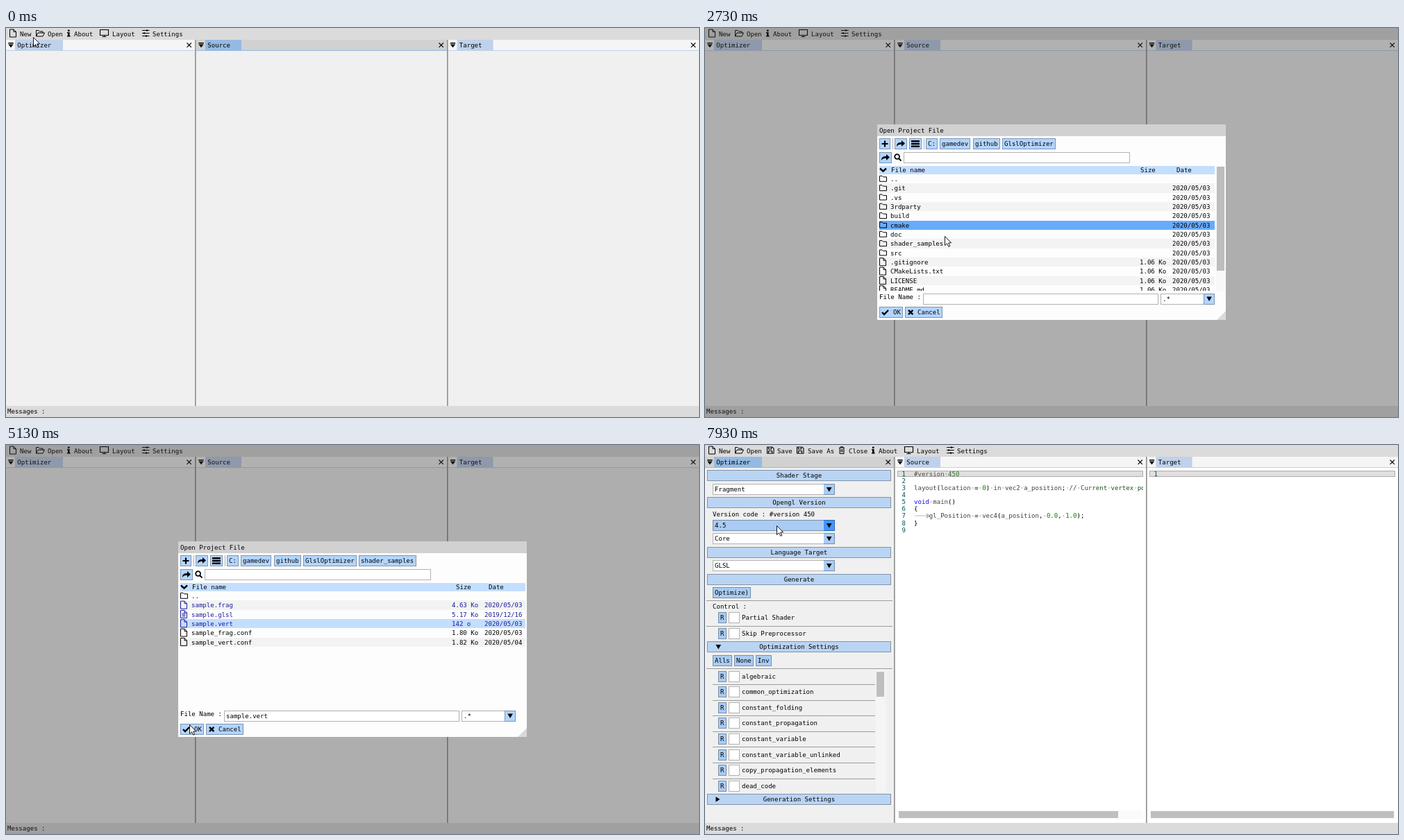
An HTML page with a canvas that plays this animation: 998 by 561 pixels, repeating every 8 s.

```html
<!DOCTYPE html>
<html lang="en">
<head>
<meta charset="utf-8">
<title>Shader optimizer</title>
<style>
  html, body { margin: 0; width: 100%; height: 100%; overflow: hidden; background: #f0f0f0; }
  canvas { display: block; width: 998px; height: 561px; }
</style>
</head>
<body>
<canvas id="stage" width="998" height="561"></canvas>
<script>
const g = document.getElementById('stage').getContext('2d');
const CHAR = 5.454, ROW = 13.33;
const BLUE = '#4296fa', PRESS = '#0f87fa', BUTTON = '#b3d5fe', PANEL_BUTTON = '#aaccf4';
const EDGE = 'rgba(0,0,0,.3)';

// [path, line width]; width 0 means filled. Origin: left edge, vertical centre.
const ICONS = {
  file: ['M.5-5.5h5.5l3.5 3.5v7.5h-9zM6-5.5v3.5h3.5', 1],
  lines: ['M2.5-1h5M2.5 1h5M2.5 3h5', 1],
  open: ['M.5 4.5v-8.5h3.5l1.5 1.5h4.5v2M.5 4.5l2.5-5h9.5l-2.5 5z', 1],
  info: ['M1-5h2.6v2.4h-2.6zM0-1.5h3.6v5h1v1.6h-4.6v-1.6h1v-3.4h-1z', 0],
  monitor: ['M.5-5h12v8h-12zM6.5 3v2M3.5 5h6', 1.1],
  sliders: ['M0-4h10.5M0 0h10.5M0 4h10.5M7-5.5v3M3-1.5v3M6 2.5v3', 1.2],
  save: ['M.5-4.5h7.5l2 2v7h-9.5zM2.5-4.5v3h4v-3M2.5 4.5v-3.5h5v3.5', 1.1],
  trash: ['M0-3.5h8M2.5-3.5v-1.5h3v1.5M1-3.5v8.5h6v-8.5M3-1.5v4.5M5-1.5v4.5', 1],
  folder: ['M.5-4h3.5l1.5 1.5h5v6.5h-10z', 1],
  plus: ['M0 0h9M4.5-4.5v9', 2.2],
  share: ['M0 4c0-5 2.5-6 7-6v-3l5 4.5l-5 4.5v-3c-4 0-5.5.5-7 3z', 0],
  drives: ['M0-5h12v2.6h-12zM0-1.3h12v2.6h-12zM0 2.4h12v2.6h-12z', 0],
  search: ['M8-1a3.4 3.4 0 1 1-6.8 0a3.4 3.4 0 1 1 6.8 0M7 1.5l3.5 3.5', 1.8],
  check: ['M1 0l3 3l6-6', 2.4],
  cross: ['M1-3.2l6.4 6.4M7.4-3.2l-6.4 6.4', 2.4],
  close: ['M0-3l6.4 6.4M6.4-3l-6.4 6.4', 1.1],
  chevron: ['M1-2l4.5 4.2l4.5-4.2', 2.4],
  menu: ['M0-4h7.4v1.4h-7.4zM0-1.4h7.4l-3.7 4.6z', 0],
  down: ['M0-3h7.6l-3.8 6.4z', 0],
  right: ['M0-3.8v7.6l6-3.8z', 0],
  pointer: ['M0 0v13l3-2.7l2.3 4.5l2-.9l-2.2-4.4l4-.2z', 0]
};

const BUILD = ['..', '.vs', '3rdparty', 'CMakeFiles', 'Debug', 'GlslOptimizerV2', 'GlslOptimizerV2App.dir',
  'ImGuiColorTextEdit.dir', 'ImGuiFileDialog.dir', 'Win32', 'ctools.dir', 'glad.dir', 'imgui.dir']
  .map((name, i) => ({ name, size: '', date: i ? '2020/05/03' : '', dir: true }));
const ROOT = ['..', '.git', '.vs', '3rdparty', 'build', 'cmake', 'doc', 'shader_samples', 'src',
  '.gitignore', 'CMakeLists.txt', 'LICENSE', 'README.md']
  .map((name, i) => ({ name, size: i > 8 ? '1.06 Ko' : '', date: i ? '2020/05/03' : '', dir: i < 9 }));
const SAMPLES = [
  { name: '..', size: '', date: '', dir: true },
  { name: 'sample.frag', size: '4.63 Ko', date: '2020/05/03', code: true },
  { name: 'sample.glsl', size: '5.17 Ko', date: '2019/12/16', code: true },
  { name: 'sample.vert', size: '142 o', date: '2020/05/03', code: true },
  { name: 'sample_frag.conf', size: '1.80 Ko', date: '2020/05/03' },
  { name: 'sample_vert.conf', size: '1.82 Ko', date: '2020/05/04' }
];
const CODE = ['#version 450', '', 'layout(location = 0) in vec2 a_position; // Current vertex position', '',
  'void main()', '{', '\tgl_Position = vec4(a_position, 0.0, 1.0);', '}', ''];
const PASSES = ['algebraic', 'common_optimization', 'constant_folding', 'constant_propagation',
  'constant_variable', 'constant_variable_unlinked', 'copy_propagation_elements', 'dead_code'];

// Pointer path: time, x, y
const PATH = [
  [0, 39, 13], [130, 50, 10], [200, 50, 10], [330, 60, 9], [1000, 60, 9], [1200, 110, 45], [1400, 270, 150],
  [1530, 400, 182], [1670, 465, 173], [1800, 473, 171], [2200, 473, 171], [2470, 430, 235], [2730, 345, 300],
  [2930, 325, 308], [3200, 325, 308], [3400, 325, 304], [3530, 323, 296], [3670, 322, 281], [3730, 322, 271],
  [3800, 320, 258], [3930, 318, 246], [4070, 318, 246], [4200, 316, 257], [4800, 316, 257], [5000, 292, 350],
  [5130, 264, 403], [5400, 268, 407], [6130, 268, 407], [6330, 318, 370], [6470, 316, 310], [6600, 225, 262],
  [6670, 207, 251], [6870, 207, 251], [7130, 170, 190], [7330, 112, 105], [7400, 105, 99], [7530, 103, 113],
  [7600, 103, 116], [8000, 103, 116]
];
const CLICKS = [[2130, 2200], [3200, 3270], [4670, 4730], [5730, 5870]];

let time, hot, pressed;

const stepTime = k => Math.round(k * 20 / 3) * 10;

function pointerAt(t) {
  const i = Math.max(1, PATH.findIndex(p => p[0] >= t));
  const [t0, x0, y0] = PATH[i - 1], [t1, x1, y1] = PATH[i];
  const u = (t - t0) / (t1 - t0);
  return { x: x0 + (x1 - x0) * u, y: y0 + (y1 - y0) * u };
}

const over = (x, y, w, h) => hot.x >= x && hot.x < x + w && hot.y >= y && hot.y < y + h;
const react = (isHot, base) => !isHot ? base : pressed ? PRESS : BLUE;

function rect(x, y, w, h, fill) {
  g.fillStyle = fill;
  g.fillRect(x, y, w, h);
}
function box(x, y, w, h, fill, edge = EDGE) {
  rect(x, y, w, h, fill);
  g.strokeStyle = edge;
  g.lineWidth = 1;
  g.strokeRect(x + .5, y + .5, w - 1, h - 1);
}
function text(s, x, y, color = '#000') {
  g.fillStyle = color;
  g.fillText(s, x, Math.round(y + 3.1));
}
function icon(name, x, y, color = '#000') {
  const [d, width] = ICONS[name];
  g.save();
  g.translate(x, y);
  g.fillStyle = g.strokeStyle = color;
  g.lineWidth = width;
  width ? g.stroke(new Path2D(d)) : g.fill(new Path2D(d));
  g.restore();
}
function clipped(x, y, w, h, draw) {
  g.save();
  g.beginPath();
  g.rect(x, y, w, h);
  g.clip();
  draw();
  g.restore();
}
function button(x, y, w, label, base = BUTTON, pad = 3) {
  box(x, y, w, 16, react(over(x, y, w, 16), base));
  text(label, x + pad, y + 8.3);
}
function iconButton(x, y, w, name, dx) {
  box(x, y, w, 16, react(over(x, y, w, 16), BUTTON));
  icon(name, x + dx, y + 8);
}

function menuBar(loaded) {
  rect(0, 0, 998, 17, '#dbdbdb');
  const rest = loaded ? 152 : 0;
  const items = [['file', 5, 'New', 20], ['open', 43, 'Open', 60]];
  if (loaded) items.push(['save', 89, 'Save', 104], ['save', 132, 'Save As', 148], ['trash', 193, 'Close', 207]);
  items.push(['info', 88 + rest, 'About', 98 + rest], ['monitor', 135 + rest, 'Layout', 153 + rest],
    ['sliders', 196 + rest, 'Settings', 211 + rest]);
  for (const [name, ix, label, x] of items) {
    icon(name, ix, 7.5);
    text(label, x, 8.5);
  }
}

function titleBar(x, w, label, tabWidth, focused) {
  const tab = focused ? '#94bae3' : '#bfd1ec';
  rect(x, 17, w, 15, focused ? '#d1d1d1' : '#f5f5f5');
  rect(x + 13, 17, tabWidth, 15, tab);
  rect(x, 32, w, 1, tab);
  icon('menu', x + 3.3, 25);
  text(label, x + 16.3, 25);
  icon('close', x + w - 11.5, 24.5);
}

function header(y, label, arrow) {
  box(3, y, 265, 16, over(3, y, 265, 16) ? '#65a8f8' : '#bad4f3');
  text(label, 135.5 - label.length * CHAR / 2, y + 8.3);
  if (arrow) icon(arrow, 15.5, y + 8);
}
function combo(y, label) {
  const isHot = over(11, y, 176, 16);
  rect(11, y, 160, 16, isHot ? PANEL_BUTTON : '#fff');
  box(171, y, 16, 16, isHot ? BLUE : PANEL_BUTTON, 'rgba(0,0,0,0)');
  icon('down', 175, y + 8);
  box(11, y, 176, 16, 'rgba(0,0,0,0)');
  text(label, 14, y + 8.3);
}
function option(y, label) {
  button(19, y - 8, 12, 'R', PANEL_BUTTON);
  box(34, y - 8, 16, 16, '#fff');
  text(label, 53, y + .3);
}
const rule = (x, y, w) => rect(x, Math.round(y), w, 1, '#9c9c9c');

function optimizerPanel() {
  header(36, 'Shader Stage');
  combo(56, 'Fragment');
  header(75, 'Opengl Version');
  text('Version code : #version 450', 11, 100);
  combo(108, '4.5');
  combo(127, 'Core');
  header(147, 'Language Target');
  combo(166, 'GLSL');
  header(186, 'Generate');
  button(11, 205, 55, 'Optimize)', PANEL_BUTTON);
  rule(2, 224, 268);
  text('Control :', 11, 233);
  option(249, 'Partial Shader');
  rule(2, 261, 268);
  option(272, 'Skip Preprocessor');
  header(283, 'Optimization Settings', 'down');
  button(11, 303, 28, 'Alls', PANEL_BUTTON);
  button(42, 303, 28, 'None', PANEL_BUTTON);
  button(73, 303, 23, 'Inv', PANEL_BUTTON);
  rule(2, 322, 268);
  clipped(3, 325, 265, 175, () => {
    PASSES.forEach((name, i) => {
      const y = 333.5 + i * 22.6;
      option(Math.round(y), name);
      rule(11, y + 11.5, 234);
    });
    rect(246, 325, 14, 175, '#f5f5f5');
    rect(247, 327, 11, 36, '#bebebe');
  });
  header(503, 'Generation Settings', 'right');
}

function tokenColor(token, preprocessor) {
  const number = /^\d/.test(token);
  if (preprocessor) return number ? '#307020' : '#505040';
  if (number) return '#008000';
  if (token.startsWith('//')) return '#205020';
  if (token === 'void') return '#060cff';
  return /\w/.test(token) ? '#404040' : '#000';
}
function codeLine(line, x, y) {
  for (const token of line.match(/\/\/.*|\d+\.\d|\d+|[A-Za-z_]\w*|\s|./g) || []) {
    if (token === '\t') {
      rect(x + 1, Math.round(y) - .5, 19, 1, '#bbb');
      icon('right', x + 18, y, '#bbb');
      x += 4 * CHAR;
      continue;
    }
    text(token, x, y, tokenColor(token, line[0] === '#'));
    [...token].forEach((c, i) => c === ' ' && rect(x + (i + .5) * CHAR - .6, y - .6, 1.3, 1.3, '#909090'));
    x += token.length * CHAR;
  }
}
function editor(x, w, lines, thumbWidth) {
  rect(x - 3, 33, w + 7, 512, '#fff');
  box(x, 37, w, 9, '#dfdfdf', '#adadad');
  clipped(x, 34, w, 500, () => lines.forEach((line, i) => {
    const y = 41.7 + i * 10.1;
    text(String(i + 1), x + 6.5, y, '#005050');
    codeLine(line, x + 24, y);
  }));
  rect(x, 527, w, 12, '#fafafa');
  rect(x + 2, 528, thumbWidth, 10, '#bfbfbf');
}

function fileList(rows, scroll, chosen) {
  const right = scroll ? 734 : 748, shift = scroll ? 0 : 16;
  rect(251, 199, right - 251, 12, '#c4deff');
  icon('chevron', 251, 204.5);
  text('File name', 268, 205);
  text('Size', 627 + (scroll ? 0 : 21), 205);
  text('Date', 679 + shift, 205);
  clipped(248, 211, 502, 168, () => rows.forEach((row, i) => {
    const y = 217.8 + i * ROW, top = Math.round(y - ROW / 2);
    const height = Math.round(y + ROW / 2) - top, width = right - 251;
    const color = row.code ? '#1a1a9c' : '#000';
    if (i % 2) rect(251, top, width, height, '#f3f3f3');
    if (row.name === chosen) rect(251, top, width, height, '#c4deff');
    if (over(251, top, width, height)) rect(251, top, width, height, pressed ? BLUE : '#68abfb');
    icon(row.dir ? 'folder' : 'file', 251, y - .5, color);
    if (row.name === 'sample.glsl') icon('lines', 251, y - .5, color);
    text(row.name, 267, y, color);
    text(row.size, 626 + shift, y, color);
    text(row.date, 673 + shift, y, color);
  }));
  if (scroll) {
    rect(736, 199, 13, 181, '#f8f8f8');
    rect(737, 200, 11, scroll, '#bdbdbd');
  }
}

function dialog() {
  rect(248, 139, 502, 282, '#fdfdfd');
  rect(248, 139, 502, 17, '#d1d1d1');
  text('Open Project File', 251, 148);
  iconButton(251, 159, 16, 'plus', 3.5);
  rect(270, 159, 1, 16, '#b0b0b0');
  iconButton(273, 159, 18, 'share', 3);
  iconButton(294, 159, 18, 'drives', 3);
  rect(315, 159, 1, 16, '#b0b0b0');

  const folder = time < 2200 ? ['build'] : time < 3270 ? [] : ['shader_samples'];
  let x = 318;
  for (const part of ['C:', 'gamedev', 'github', 'GlslOptimizer', ...folder]) {
    const w = part.length * CHAR + 6.2;
    button(Math.round(x), 159, Math.round(w), part);
    x += w + 3.1;
  }
  iconButton(251, 179, 18, 'share', 3);
  icon('search', 272, 186.5);
  box(286, 179, 326, 16, '#fff');

  const chosen = time >= 4730 ? 'sample.vert' : '';
  if (time < 2200) fileList(BUILD, 56);
  else if (time < 3270) fileList(ROOT, 150);
  else fileList(SAMPLES, 0, chosen);

  text('File Name :', 251, 388.3);
  box(314, 383, 339, 16, '#fff');
  text(chosen, 317, 391);
  box(656, 383, 78, 16, '#fff');
  text('.*', 659, 391);
  box(718, 383, 16, 16, BUTTON);
  icon('down', 722.3, 390.5);

  button(251, 402, 34, 'OK', BUTTON, 20);
  icon('check', 254, 410);
  button(288, 402, 54, 'Cancel', BUTTON, 18);
  icon('cross', 292, 410);
  g.fillStyle = '#d9d9d9';
  g.fill(new Path2D('M750 408v13h-13z'));
}

function pointer({ x, y }) {
  icon('pointer', x + .5, y + .5, '#fff');
  g.save();
  g.translate(x + .5, y + .5);
  g.strokeStyle = '#000';
  g.lineWidth = .9;
  g.stroke(new Path2D(ICONS.pointer[0]));
  g.restore();
}

function draw(k) {
  time = stepTime(k);
  // Widgets answer to where the pointer was one step earlier.
  hot = pointerAt(stepTime(Math.max(0, k - 1)));
  pressed = CLICKS.some(([from, to]) => time >= from && time < to);
  const loaded = time >= 5870, modal = time >= 730 && !loaded;

  rect(0, 0, 998, 561, '#f0f0f0');
  menuBar(loaded);
  if (loaded) {
    optimizerPanel();
    editor(277, 354, CODE, 316);
    editor(640, 354, [''], 350);
  }
  titleBar(0, 272, 'Optimizer', 69, time >= 7930);
  titleBar(274, 361, 'Source', 52, time < 600 || (loaded && time < 7930));
  titleBar(636.5, 361.5, 'Target', 52, false);
  rect(272, 17, 1.6, 528, '#8f8f8f');
  rect(635, 17, 1.6, 528, '#8f8f8f');
  rect(0, 545, 998, 16, '#dbdbdb');
  text('Messages :', 2, 553);

  if (modal) {
    rect(0, 0, 998, 561, `rgba(51,51,51,${time < 800 ? .19 : .35})`);
    dialog();
  }
  pointer(pointerAt(time));
}

const start = performance.now();
let shown = -1;
function tick() {
  const t = (performance.now() - start) % 8000;
  const k = Math.floor((t + 3.5) * 3 / 200) % 120;
  if (k !== shown) {
    g.font = '9.06px "DejaVu Sans Mono", monospace';
    draw(k);
    shown = k;
  }
  requestAnimationFrame(tick);
}
tick();
</script>
</body>
</html>
```
